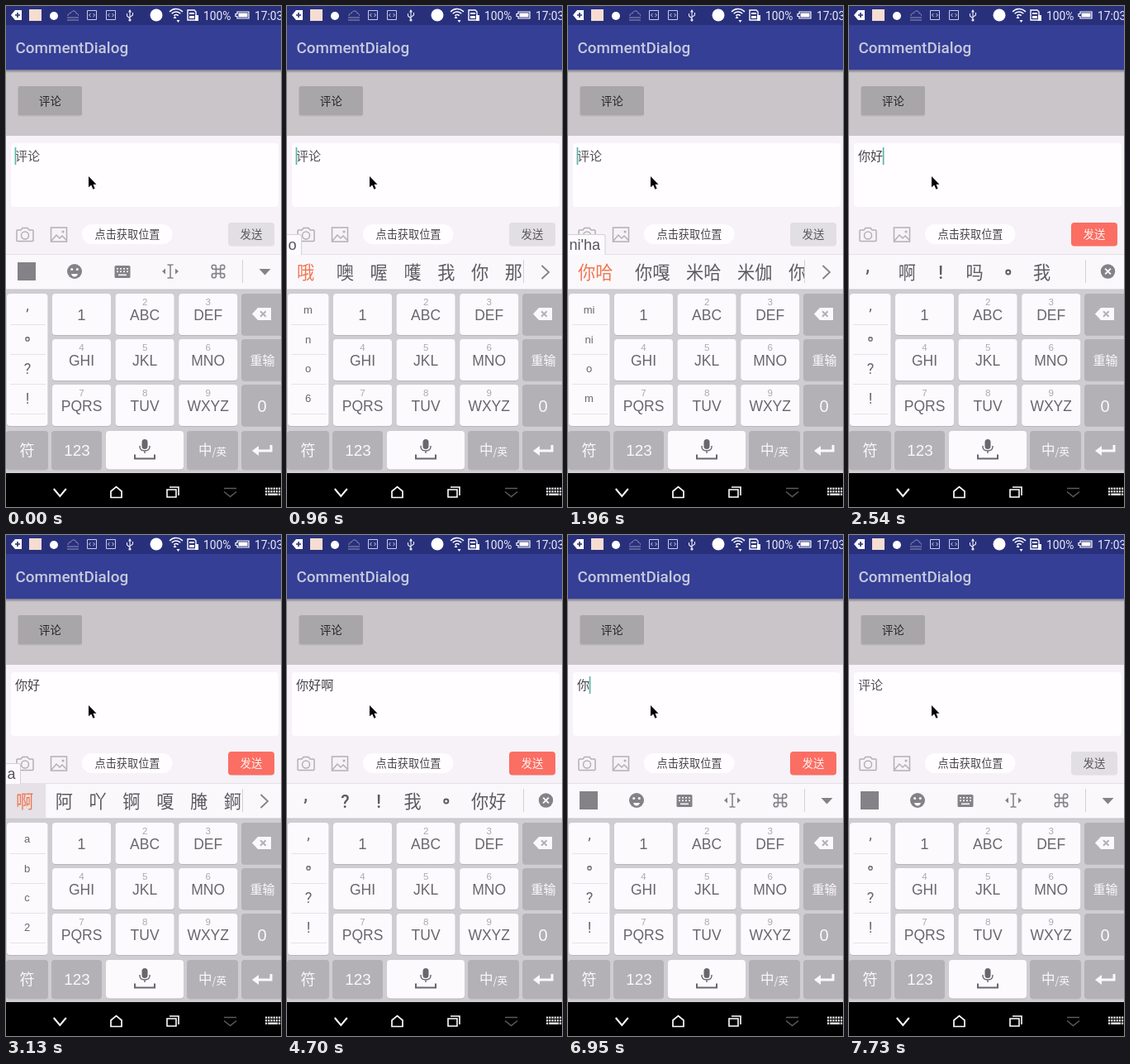
Write an HTML page with a canvas that moves like this. It is 333x606 px and loops after 8000 ms.

```html
<!DOCTYPE html>
<html lang="zh-CN">
<head>
<meta charset="utf-8">
<title>Comment dialog</title>
<style>
html, body { margin: 0; width: 100%; height: 100%; overflow: hidden; background: #000; }
canvas { display: block; width: 333px; height: 606px; }
</style>
</head>
<body>
<canvas id="stage"></canvas>
<script>
const W = 333, H = 606, LOOP = 8000;
const canvas = document.getElementById('stage');
const ctx = canvas.getContext('2d');
const dpr = window.devicePixelRatio || 1;
canvas.width = W * dpr;
canvas.height = H * dpr;

const CJK = '"Noto Sans CJK SC", "Noto Sans CJK", sans-serif';
const ROBOTO = 'Roboto, ' + CJK;
const ARIAL = '"Liberation Sans", ' + CJK;
const GREY = '#858287', KEY_GREY = '#b4b1b6', INK = '#69666c', ORANGE = '#f0764f';

const PUNCT = [',', '。', '?', '!'];
const SYLLABLES = ['mi', 'ni', 'o', 'm'];
const TOOLS = { bar: 'tools', list: PUNCT, pinyin: '', words: [], hot: false };

// Each entry changes part of the state from its time onwards.
const EVENTS = [
  [0, { text: '', caret: true, key: '', ...TOOLS }],
  [250, { caret: false }],
  [670, { key: 'MNO' }],
  [740, { caret: true }],
  [820, { bar: 'words', pinyin: 'o', words: ['哦', '噢', '喔', '嚄', '我', '你', '那'], list: ['m', 'n', 'o', '6'] }],
  [940, { key: '' }],
  [1220, { caret: false }],
  [1290, { key: 'GHI' }],
  [1350, { pinyin: 'ni', words: ['你', '米', '呢', '尼', '密', '迷', '咪'], list: SYLLABLES }],
  [1520, { key: '' }],
  [1670, { key: 'GHI' }],
  [1730, { caret: true, pinyin: "ni'h", words: ['你好', '你会', '米行', '你和', '你'] }],
  [1800, { key: '' }],
  [1860, { key: 'ABC' }],
  [1910, { pinyin: "ni'ha", words: ['你哈', '你嘎', '米哈', '米伽', '你'] }],
  [1960, { key: '' }],
  [2020, { key: 'MNO' }],
  [2070, { key: '', pinyin: "ni'hao", words: ['你好', '你号', '拟好', '米好', '你'] }],
  [2250, { caret: false }],
  [2310, { hot: true }],
  [2540, { ...TOOLS, text: '你好', caret: true, bar: 'next', words: [',', '啊', '!', '吗', '。', '我'] }],
  [2600, { key: 'ABC' }],
  [2660, { bar: 'words', pinyin: 'a', words: ['啊', '阿', '吖', '锕', '嗄', '腌', '錒'], list: ['a', 'b', 'c', '2'] }],
  [2720, { key: '' }],
  [3070, { caret: false }],
  [3130, { hot: true }],
  [3240, { ...TOOLS, text: '你好啊', caret: true, bar: 'next', words: [',', '?', '!', '我', '。', '你好'] }],
  [3690, { caret: false }],
  [4200, { caret: true }],
  [4700, { caret: false }],
  [5170, { caret: true }],
  [5670, { caret: false }],
  [6200, { caret: true }],
  [6450, { key: 'DEL' }],
  [6540, { text: '你好', ...TOOLS }],
  [6620, { key: '' }],
  [6800, { key: 'DEL' }],
  [6950, { key: '', text: '你' }],
  [7070, { key: 'DEL' }],
  [7240, { key: '', text: '' }],
  [7410, { key: 'DEL' }],
  [7550, { key: '' }],
  [7730, { caret: false }]
];

function stateAt(t) {
  const state = {};
  for (const [start, patch] of EVENTS) if (start <= t) Object.assign(state, patch);
  return state;
}

function rect(x, y, w, h, color) {
  ctx.fillStyle = color;
  ctx.fillRect(x, y, w, h);
}

function round(x, y, w, h, r, color) {
  ctx.fillStyle = color;
  ctx.beginPath();
  ctx.roundRect(x, y, w, h, r);
  ctx.fill();
}

function disc(x, y, r, color) {
  ctx.fillStyle = color;
  ctx.beginPath();
  ctx.arc(x, y, r, 0, Math.PI * 2);
  ctx.fill();
}

function arc(x, y, r, from, to, color, width) {
  ctx.beginPath();
  ctx.arc(x, y, r, from, to);
  ctx.strokeStyle = color;
  ctx.lineWidth = width;
  ctx.stroke();
}

function ring(x, y, r, color, width) {
  arc(x, y, r, 0, Math.PI * 2, color, width);
}

// Strokes the path when a width is given, otherwise fills it.
function trace(d, x, y, color, width) {
  ctx.save();
  ctx.translate(x, y);
  const path = new Path2D(d);
  if (width) {
    ctx.strokeStyle = color;
    ctx.lineWidth = width;
    ctx.stroke(path);
  } else {
    ctx.fillStyle = color;
    ctx.fill(path);
  }
  ctx.restore();
}

// y is the middle of the glyphs.
function label(s, x, y, size, color, family = CJK, align = 'center', weight = 400) {
  ctx.font = `${weight} ${size}px ${family}`;
  ctx.textAlign = align;
  ctx.fillStyle = color;
  ctx.fillText(s, x, y + size * 0.37);
}

function punct(s, x, y, size, color, weight = 400) {
  if (s === '。') ring(x, y, size * 0.12, color, size * weight / 5600);
  else label(s, x, s === ',' ? y - size * 0.35 : y, size, color, ROBOTO, 'center', weight);
}

function statusBar() {
  rect(0, 0, W, 23, '#29307b');
  trace('M-7 0L-2 -6H6V6H-2Z', 13, 11, '#fff');
  trace('M-2 0H4M1 -3V3', 13, 11, '#29307b', 1.6);
  rect(28, 4, 15, 14, '#f6ddd2');
  disc(58, 12, 5, '#fff');
  trace('M-6 1C-6 -2 -4 -2 -3 -2C-2 -6 4 -6 4 -2C7 -2 7 1 6 1M-7 3H7M-7 6H7', 81, 11, '#8f94bd', 1);
  for (const x of [104, 127]) {
    trace('M-5.5 -5.5H5.5V5.5H-5.5Z', x, 11, '#c9cce3', 1);
    trace('M-1.5 -2L-3.5 0L-1.5 2M1.5 -2L3.5 0L1.5 2', x, 11, '#c9cce3', 1);
  }
  trace('M0 -6V6M-3.5 -2V1L0 4M3.5 -3V0L0 2.5', 150, 11, '#e6e8f4', 1.1);
  trace('M0 -8L2 -4.5H-2Z', 150, 12, '#e6e8f4');
  disc(150, 17, 1.6, '#e6e8f4');
  disc(182, 11, 7.5, '#fff');
  for (const r of [3.5, 7, 10.5]) {
    arc(206, 14, r, -Math.PI * 0.77, -Math.PI * 0.23, '#fff', 1.5);
  }
  trace('M-3.5 -1L-1.5 -4L0.5 -1ZM0.5 1L2.5 4L4.5 1Z', 206, 16, '#fff');
  trace('M-6 -6H2L4 -4V6H-6Z', 226, 11, '#fff', 1.4);
  rect(222, 8, 6, 2, '#fff');
  rect(222, 12, 6, 3, '#fff');
  rect(229, 11, 4, 7, '#fff');
  label('100%', 239, 11.5, 13.8, '#e9eaf4', ROBOTO, 'left');
  trace('M0 -4H14V4H0V1.5H-2V-1.5H0Z', 280, 11, '#fff', 1.2);
  rect(281.5, 8.5, 11, 5, '#fff');
  label('17:03', 301, 11.5, 13.8, '#e9eaf4', ROBOTO, 'left');
}

function page() {
  label('CommentDialog', 11.5, 50.5, 18.9, '#c7c9dc', ROBOTO, 'left', 500);
  rect(0, 77, W, 80, '#c9c5c9');
  const shade = ctx.createLinearGradient(0, 77, 0, 81);
  shade.addColorStop(0, '#77758a');
  shade.addColorStop(1, '#c9c5c9');
  rect(0, 77, W, 4, shade);
  round(14, 97, 78, 36.5, 3, '#b9b6ba');
  round(15, 97, 77, 35, 2, '#a9a6aa');
  label('评论', 53.5, 115, 13.4, '#252427');
}

function dialog(s) {
  rect(0, 157, W, 144, '#f6f2f8');
  round(6, 166, 324, 77, 4, '#fffdff');
  label(s.text || '评论', 11, 181.5, 15.1, s.text ? '#454347' : '#555257', CJK, 'left');
  if (s.caret) rect(10.6 + s.text.length * 15.1, 171, 1.7, 21, '#5bb5aa');

  const line = '#b3b0b5';
  trace('M-9 -5.5H-5L-3 -8H3L5 -5.5H9Q10 -5.5 10 -4.5V7Q10 8 9 8H-9Q-10 8 -10 7V-4.5Q-10 -5.5 -9 -5.5Z', 23, 276.5, line, 1.5);
  ring(23, 277.5, 4.5, line, 1.5);
  trace('M-9.5 -8.5H9.5V8.5H-9.5Z', 64, 276.5, line, 1.5);
  trace('M-9 6L-3 -1L1 3L4 0L9 5', 64, 278, line, 1.5);
  disc(69, 273, 1.5, line);

  round(92, 264, 109.5, 24, 12, '#fffdff');
  label('点击获取位置', 147, 276.5, 13.2, '#454347');
  round(269, 262, 56, 28.5, 4, s.text ? '#fb6e63' : '#e2dfe4');
  label('发送', 297, 276.5, 13.4, s.text ? '#fff3f1' : '#5a575c');
}

function pointer() {
  const d = 'M0 0V13.3L3.2 10.5L5.5 15.7L7.6 14.8L5.5 9.7H9.5Z';
  trace(d, 100, 206, '#fff', 1.6);
  trace(d, 100, 206, '#000');
}

function tools() {
  const paper = '#fbf8fc';
  rect(14, 310, 22, 22, GREY);
  disc(83, 321, 9, GREY);
  disc(79.7, 318.5, 1.5, paper);
  disc(86.3, 318.5, 1.5, paper);
  trace('M-4 3H4Q3 6.5 0 6.5Q-3 6.5 -4 3Z', 83, 321, paper);
  round(131.5, 314, 19, 15, 1.5, GREY);
  for (let i = 0; i < 8; i++) rect(134 + (i % 4) * 4, 317 + (i >> 2) * 3.5, 2, 1.6, paper);
  rect(136, 324.5, 10, 1.6, paper);
  trace('M-3.5 -8H-1L0 -7L1 -8H3.5M0 -7V7M-3.5 8H-1L0 7L1 8H3.5', 199, 321, GREY, 1.6);
  trace('M-6 -3.5V3.5L-10 0ZM6 -3.5V3.5L10 0Z', 199, 321, GREY);

  trace('M-2.6 -5.2V5.2M2.6 -5.2V5.2M-5.2 -2.6H5.2M-5.2 2.6H5.2', 257, 321, GREY, 1.6);
  for (let a = Math.PI / 4; a < Math.PI * 2; a += Math.PI / 2) {
    const x = 257 + 5.2 * Math.SQRT2 * Math.cos(a), y = 321 + 5.2 * Math.SQRT2 * Math.sin(a);
    arc(x, y, 2.6, a - Math.PI * 0.75, a + Math.PI * 0.75, GREY, 1.6);
  }
  trace('M-7 -3.5H7L0 4Z', 313.5, 321.5, GREY);
}

function candidates(s) {
  const size = 21.2;
  if (s.hot) rect(0, 301, 27 + s.words[0].length * size, 41, '#e5e1e7');
  ctx.save();
  ctx.beginPath();
  ctx.rect(0, 300, 286, 43);
  ctx.clip();
  let x = 12;
  s.words.forEach((word, i) => {
    const w = word.length * size;
    const color = i === 0 && s.bar === 'words' ? ORANGE : '#5d5a60';
    if (PUNCT.includes(word)) punct(word, x + w / 2, 322, size, color, 500);
    else label(word, x, 322, size, color, CJK, 'left');
    x += w + (i ? 19.6 : 26.6);
  });
  ctx.restore();
  if (s.bar === 'words') {
    trace('M-4.5 -8L4 0L-4.5 8', 313, 322, GREY, 1.8);
  } else {
    disc(313.5, 321, 8.7, GREY);
    trace('M-3.4 -3.4L3.4 3.4M3.4 -3.4L-3.4 3.4', 313.5, 321, '#fbf8fc', 2);
  }
}

function pinyinTag(s) {
  if (!s.pinyin) return;
  ctx.font = `400 18px ${ARIAL}`;
  const w = ctx.measureText(s.pinyin).width + 8;
  round(-4, 276, w + 4, 25, [0, 3, 0, 0], '#d3d0d5');
  round(-4, 277, w + 3, 24, [0, 2, 0, 0], '#fdfafe');
  label(s.pinyin, 1.5, 288.3, 18, '#565358', ARIAL, 'left');
}

function key(x, y, w, h, color) {
  round(x, y + 1, w, h, 4, '#b9b6bb');
  round(x, y, w, h, 4, color);
}

function keyboard(s) {
  rect(0, 300, W, 43, '#fbf8fc');
  rect(0, 300, W, 1, '#e4e1e6');
  if (s.bar === 'tools') tools();
  else candidates(s);
  rect(286, 307, 1, 28, '#d5d2d7');
  pinyinTag(s);

  rect(0, 343, W, 222, '#d0cdd2');
  rect(0, 342.5, W, 1, '#c6c3c8');
  key(1, 348, 49.5, 160, '#fdfafe');
  s.list.forEach((item, i) => {
    const y = 367.3 + i * 35.6;
    rect(5, 385 + i * 36, 43, 1, '#e6e3e8');
    if (PUNCT.includes(item)) punct(item, 26, y, 18, INK);
    else label(item, 25.5, y, 13, INK, ARIAL);
  });

  const rowY = row => 348 + row * 55;
  ['1', 'ABC', 'DEF', 'GHI', 'JKL', 'MNO', 'PQRS', 'TUV', 'WXYZ'].forEach((name, i) => {
    const x = 56 + (i % 3) * 76.6, y = rowY(Math.floor(i / 3));
    key(x, y, 71, 50, s.key === name ? '#e2dde4' : '#fdfafe');
    if (i) label(i + 1, x + 35.5, y + 9.5, 11.5, '#aba8ad', ARIAL);
    label(name, x + 35.5, y + (i ? 25.7 : 24.8), i ? 17.5 : 18.5, INK, ARIAL);
  });

  const white = '#fbf8fc';
  for (let i = 0; i < 3; i++) {
    key(285, rowY(i), 52, 50, i === 0 && s.key === 'DEL' ? '#9c999f' : KEY_GREY);
  }
  trace('M-12 0L-5 -7.5H11V7.5H-5Z', 310, 372.5, white);
  trace('M-2 -3.3L4.6 3.3M4.6 -3.3L-2 3.3', 310, 372.5, KEY_GREY, 2);
  label('重输', 310.5, 428.5, 15, white, CJK, 'center', 500);
  label('0', 310, 483.5, 20, white, ARIAL);

  for (const [x, w] of [[0, 51], [55, 61], [219, 62], [285, 52]]) key(x, 514, w, 46.5, KEY_GREY);
  key(121, 514, 94, 46.5, '#fdfafe');
  label('符', 25.5, 537, 18, white);
  label('123', 86, 537, 18.8, white, ARIAL);
  label('中', 233, 537, 16.5, white, CJK, 'left', 500);
  label('/英', 249.5, 539, 12.5, white, CJK, 'left');
  round(164.5, 524, 7, 12, 3.5, INK);
  trace('M-6 -1V0Q-6 5 0 5Q6 5 6 0V-1M0 5V8', 168, 533, INK, 1.4);
  trace('M-12 -5V0H12V-5', 168, 547.5, INK, 2);
  trace('M11 -6V1H-6', 310, 537, white, 3);
  trace('M-12 1L-4 -5V7Z', 310, 537, white);
}

function navBar() {
  rect(0, 565, W, 41, '#000');
  trace('M-7.5 -4.5L0 4.5L7.5 -4.5', 65.3, 588.5, '#fff', 2);
  trace('M-6.5 6.5V-1L0 -6.5L6.5 -1V6.5Z', 133.5, 588, '#fff', 1.7);
  trace('M-7 -3H4V6H-7ZM-4 -6H7V4', 202, 588, '#fff', 1.6);
  trace('M-7.5 -5H7.5M-7.5 -1L0 5L7.5 -1', 271.5, 588.5, '#5c5a5e', 1.5);
  for (let i = 0; i < 12; i++) rect(314 + (i % 6) * 3.2, 582.5 + (i > 5 ? 3.5 : 0), 2.2, 2.5, '#dedce0');
  rect(314, 589.5, 2.2, 2.5, '#dedce0');
  rect(317.2, 589.5, 12, 2.5, '#dedce0');
  rect(330, 589.5, 2.2, 2.5, '#dedce0');
}

function draw(now) {
  const s = stateAt(now % LOOP);
  ctx.setTransform(dpr, 0, 0, dpr, 0, 0);
  rect(0, 0, W, 78, '#343f95');
  statusBar();
  page();
  dialog(s);
  pointer();
  keyboard(s);
  navBar();
}

const start = performance.now();
function tick() {
  draw(performance.now() - start);
  requestAnimationFrame(tick);
}
tick();
</script>
</body>
</html>
```
